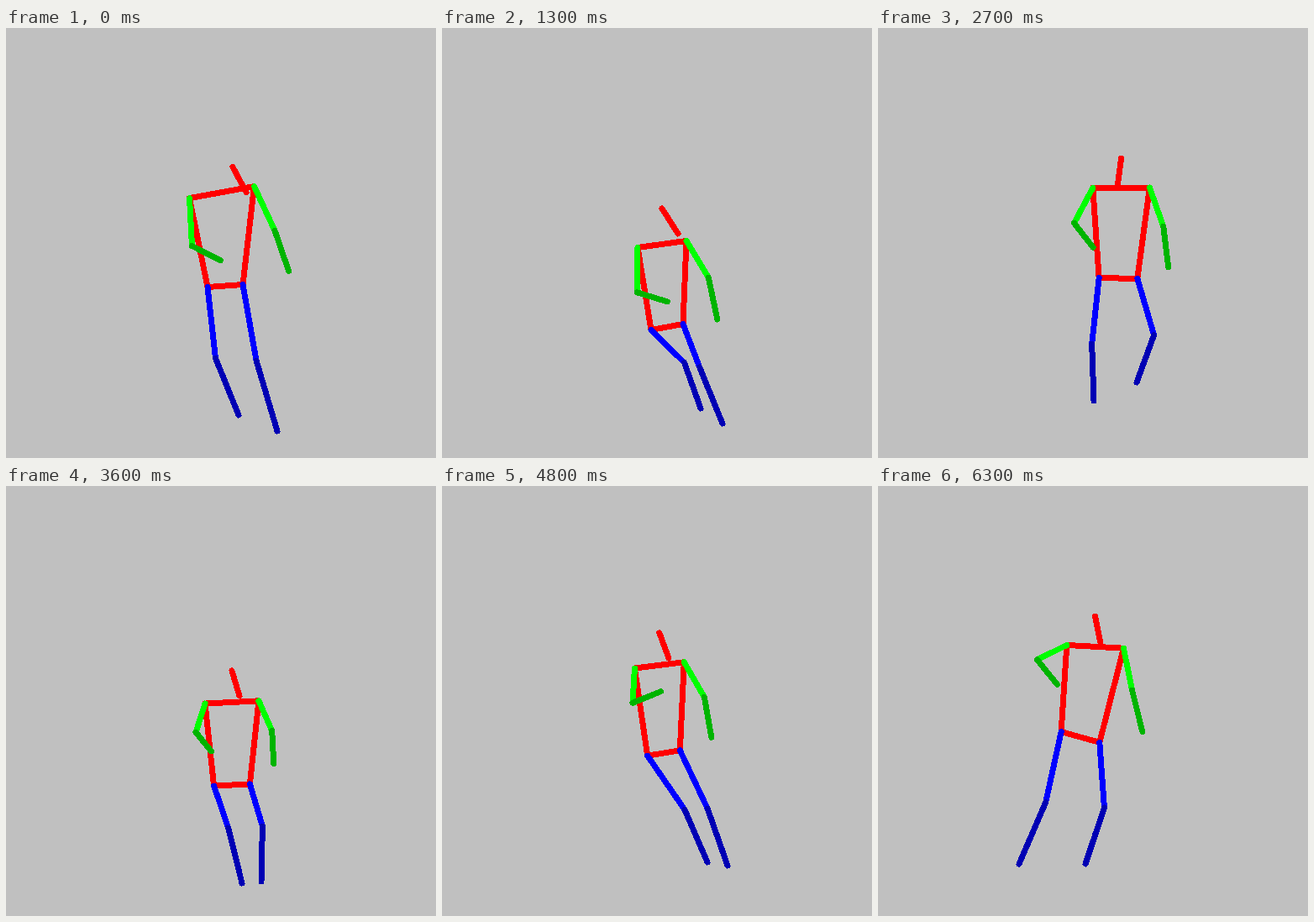
Write an HTML page that moves like this. It is 512 px wide and 512 px high and loops after 6.4 s.

```html
<!DOCTYPE html>
<html lang="en">
<head>
<meta charset="utf-8">
<title>Stick figure</title>
<style>
  html, body { margin: 0; width: 100%; height: 100%; overflow: hidden; background: #c0c0c0; }
  svg { display: block; width: 100vmin; height: 100vmin; }
</style>
</head>
<body>
<svg id="stage" viewBox="0 0 512 512" stroke-width="7" stroke-linecap="round" shape-rendering="crispEdges"></svg>
<script>
const STEP = 100;
const STEPS = 64;
const POSES = [0, 13, 27, 36, 48, 57, 63];

// Cubic interpolation that never overshoots its keys.
function curve(values, times = POSES) {
  const last = times.length - 1;
  const slope = i => (values[i + 1] - values[i]) / (times[i + 1] - times[i]);
  const tangent = i => {
    if (i === 0 || i === last) return slope(Math.min(i, last - 1));
    const a = slope(i - 1), b = slope(i);
    return a * b > 0 ? 2 * a * b / (a + b) : 0;
  };
  return t => {
    let i = 0;
    while (i < last - 1 && t >= times[i + 1]) i++;
    const span = times[i + 1] - times[i];
    const u = (t - times[i]) / span, v = 1 - u;
    return v * v * (1 + 2 * u) * values[i] + u * u * (1 + 2 * v) * values[i + 1]
      + u * v * span * (v * tangent(i) - u * tangent(i + 1));
  };
}

function path(xs, ys, times) {
  const x = curve(xs, times), y = curve(ys, times);
  return t => [x(t), y(t)];
}

function ease(t, from, to) {
  const u = Math.min(1, Math.max(0, (t - from) / (to - from)));
  return u * u * (3 - 2 * u);
}

const shift = ([x, y], dx, dy) => [x + dx, y + dy];
const mid = ([x1, y1], [x2, y2]) => [(x1 + x2) / 2, (y1 + y2) / 2];

// Angle in degrees from straight down, positive to the right.
function limb([x, y], length, degrees) {
  const a = degrees * Math.PI / 180;
  return [x + length * Math.sin(a), y + length * Math.cos(a)];
}

const pelvisPath = path(
  [261, 265, 268, 286, 269, 267, 264, 266, 241],
  [307, 353, 356, 298, 356, 358, 318, 278, 299],
  [0, 7, 13, 27, 36, 41, 48, 57, 63]);
const footPathL = path([277, 308, 257, 281, 316, 236, 168], [461, 453, 444, 473, 448, 409, 450]);
const footPathR = path([323, 334, 308, 304, 340, 296, 247], [480, 471, 422, 471, 452, 416, 450]);
const headTilt = curve([-16, -19, 4, -9, -11, -18, -6]);
const forearmL = curve([63, 73, 38, 39, 112, 30, 39]);
const forearmR = curve([19, 12, 7, 3, 10, -19, 14]);

function pose(t) {
  const opening = 1 - ease(t, 0, 13);
  const ending = ease(t, 57, 63);
  const swing = (1 - opening) * Math.cos(2 * Math.PI * (t - 29) / 32);
  const reach = 1 - 0.25 * Math.exp(-(((t - 38) / 8) ** 2));

  const pelvis = pelvisPath(t);
  const rise = 322 - pelvis[1];
  const hipX = 21 + 2 * swing;
  const hipY = -1.5 + 2 * swing + 6 * ending;
  const hipL = shift(pelvis, -hipX, -hipY);
  const hipR = shift(pelvis, hipX, hipY);

  const chest = shift(pelvis, -1 + 5 * swing + 14 * ending - 3 * opening, -104 - 0.16 * rise - 5 * opening);
  const shoulderX = 31.5 + 2.5 * swing + 7 * opening;
  const shoulderY = -2 + 2 * swing + 2 * ending - 5 * opening;
  const shoulderL = shift(chest, -shoulderX, -shoulderY);
  const shoulderR = shift(chest, shoulderX, shoulderY);

  const tilt = headTilt(t);
  const neck = shift(chest, 13 * opening - tilt, 11 * opening - 3 - 0.5 * Math.abs(tilt));
  const head = shift(neck, tilt, -30);

  const elbowL = limb(shoulderL, (57 - 0.28 * t) * reach, -15 - 14 * swing - 36 * ending + 18 * opening);
  const elbowR = limb(shoulderR, (51 + 7 * opening) * reach, 25 - 6 * swing - 8 * ending);
  const handL = limb(elbowL, 38 * reach, forearmL(t));
  const handR = limb(elbowR, 51 * reach, forearmR(t));

  const footL = footPathL(t);
  const footR = footPathR(t);
  const kneeDrop = 0.23 * rise;
  const kneeL = shift(mid(hipL, footL), 2 - 8 * swing + 12 * ending - 11 * opening, kneeDrop + 5 * opening);
  const kneeR = shift(mid(hipR, footR), 7 + 0.6 * (footL[1] - footR[1]) + 7 * ending, kneeDrop);

  return { head, neck, shoulderL, shoulderR, elbowL, elbowR, handL, handR,
    hipL, hipR, kneeL, kneeR, footL, footR };
}

const chains = {
  '#ff0000': ['head neck', 'shoulderL shoulderR', 'shoulderL hipL', 'shoulderR hipR', 'hipL hipR'],
  '#00ff00': ['shoulderL elbowL', 'shoulderR elbowR'],
  '#00b400': ['elbowL handL', 'elbowR handR'],
  '#0000ff': ['hipL kneeL', 'hipR kneeR'],
  '#0000b4': ['kneeL footL', 'kneeR footR']
};

const stage = document.getElementById('stage');
const bones = Object.entries(chains).flatMap(([color, pairs]) => pairs.map(pair => {
  const line = document.createElementNS(stage.namespaceURI, 'line');
  line.setAttribute('stroke', color);
  stage.append(line);
  return { line, ends: pair.split(' ') };
}));

function draw(t) {
  const joints = pose(t);
  for (const { line, ends } of bones) {
    ends.forEach((name, i) => {
      line.setAttribute('x' + (i + 1), joints[name][0]);
      line.setAttribute('y' + (i + 1), joints[name][1]);
    });
  }
}

const start = performance.now();
function tick() {
  draw(Math.floor((performance.now() - start) / STEP) % STEPS);
  requestAnimationFrame(tick);
}
tick();
</script>
</body>
</html>
```
